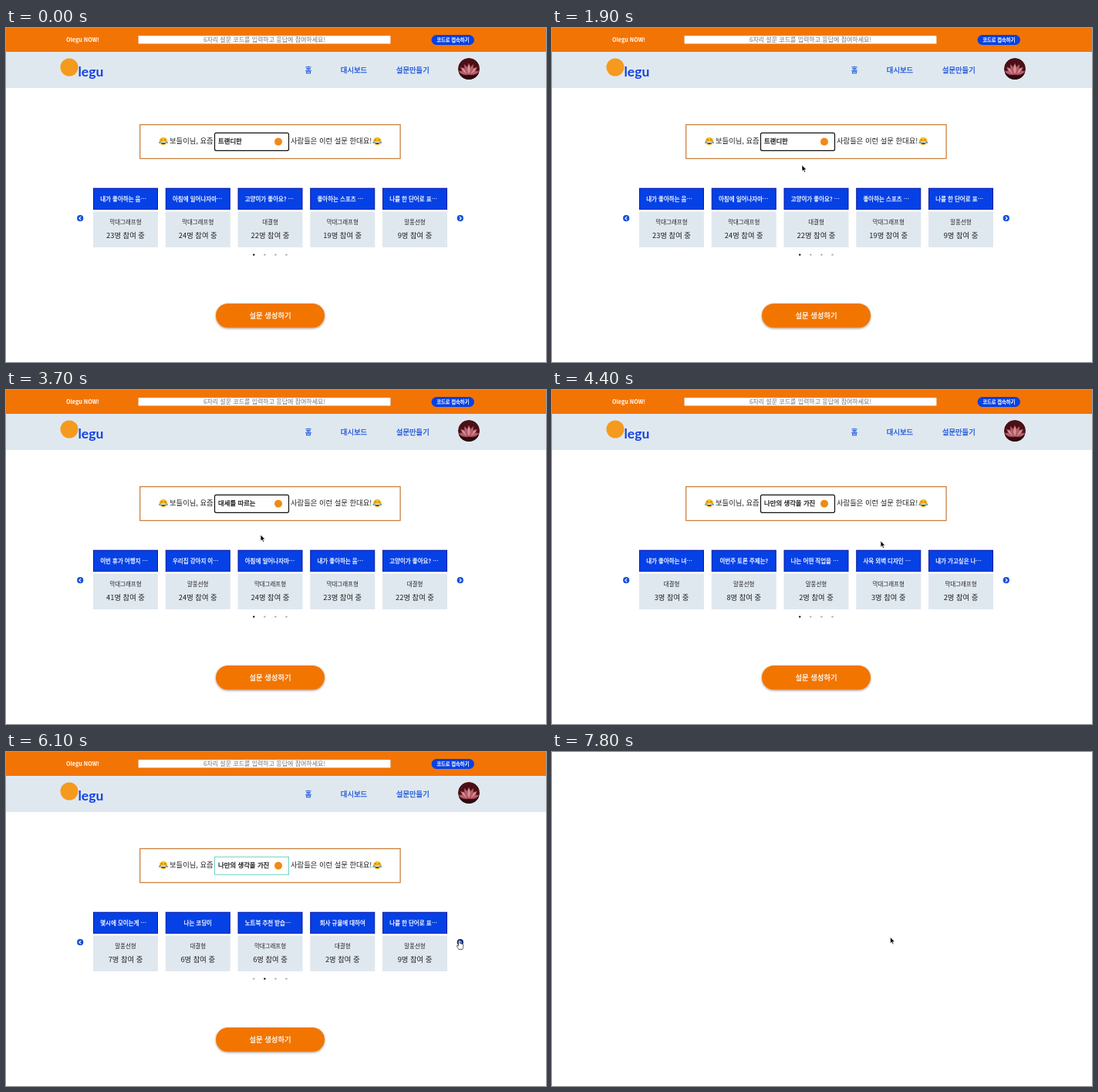
These frames come from a looping animation (700x434 px, 8 s). An HTML page:

```html
<!DOCTYPE html>
<html lang="ko">
<head>
<meta charset="utf-8">
<title>설문</title>
<style>
  html, body { margin: 0; width: 100%; height: 100%; overflow: hidden; background: #fff; }
  svg { display: block; width: 700px; height: 434px; font-family: "Noto Sans CJK KR", "Noto Sans CJK", "Noto Sans", sans-serif; }
  text { font-size: 9.33px; fill: #222; white-space: pre; }
  .mid { text-anchor: middle; }
  .medium { stroke: currentColor; stroke-width: .25px; fill: currentColor; }
  .nav { color: #1450d8; }
  .white { color: #fff; fill: #fff; }
  .small { font-size: 7.47px; }
  .option { font-size: 8.4px; }
</style>
</head>
<body>
<svg viewBox="0 0 700 434">
  <defs>
    <filter id="shade" x="-20%" y="-30%" width="140%" height="170%">
      <feDropShadow dx="0" dy="1" stdDeviation="1.5" flood-opacity=".4"/>
    </filter>
    <g id="joy">
      <circle r="5.3" fill="#fbc02d"/>
      <path d="M-3.4-1.2Q-2.2-3-1-1.2M1-1.2Q2.2-3 3.4-1.2" fill="none" stroke="#5b3a12" stroke-width=".8"/>
      <path d="M-3.3.7H3.3Q2.8 4 0 4T-3.3.7Z" fill="#6b3a16"/>
      <path d="M-3 .8H3L2.7 1.9H-2.7Z" fill="#fff"/>
      <path d="M-3.2 0Q-6.6.7-5.8 2.8Q-3.6 4-3.2 0ZM3.2 0Q6.6.7 5.8 2.8Q3.6 4 3.2 0Z" fill="#4aa8e8"/>
    </g>
    <g id="chevron">
      <circle r="4.1"/>
      <path d="M.9-2.1-1.2 0 .9 2.1" fill="none" stroke="#fff" stroke-width="1.2"/>
    </g>
    <path id="petal" d="M0 7Q-4.5 0 0-8Q4.5 0 0 7Z"/>
    <clipPath id="round"><circle r="14"/></clipPath>
  </defs>

  <g id="page">
    <rect width="700" height="31" fill="#f27405"/>
    <text x="78" y="17.7" class="white" style="font-size:7.2px;font-weight:700">Olegu NOW!</text>
    <rect x="171.5" y="10" width="327" height="10.5" rx=".8" fill="#fff" stroke="#d9a77a" stroke-width=".5"/>
    <text x="335" y="18" class="mid" style="font-size:8px;fill:#777">6자리 설문 코드를 입력하고 응답에 참여하세요!</text>
    <rect x="551.5" y="9" width="55.5" height="13" rx="6.5" fill="#0541e5"/>
    <text x="579.3" y="17.8" class="mid medium white" style="font-size:6.3px">코드로 접속하기</text>

    <rect y="31" width="700" height="47" fill="#e0e8ef"/>
    <circle cx="82" cy="51" r="11.5" fill="#f59a1c"/>
    <text x="93.5" y="62.5" style="font:700 17.5px Lato,sans-serif;fill:#1241e0">legu</text>
    <text x="392" y="58.3" class="mid medium nav">홈</text>
    <text x="451" y="58.3" class="mid medium nav">대시보드</text>
    <text x="527.3" y="58.3" class="mid medium nav">설문만들기</text>
    <g transform="translate(600 53)" clip-path="url(#round)">
      <circle r="14" fill="#4a1018"/>
      <path d="M-14 5H14V14H-14Z" fill="#2e0b10"/>
      <g id="lotus" transform="translate(0 1)"></g>
    </g>

    <rect x="173.7" y="125.6" width="337.4" height="44" fill="#fff" stroke="#cb8240" stroke-width="1.3"/>
    <use href="#joy" x="204" y="147"/>
    <text x="212" y="150.4">보들이님, 요즘</text>
    <text x="369" y="150.4">사람들은 이런 설문 한대요!</text>
    <use href="#joy" x="481.3" y="147"/>
    <rect id="select" x="270.5" y="136.3" width="96" height="23" fill="#fff"/>
    <text id="chosen" x="275" y="150.4" class="option medium" style="color:#111"></text>
    <circle cx="353" cy="147.7" r="5" fill="#f08a14"/>

    <g id="cards"></g>
    <use href="#chevron" transform="translate(96.2 247.2)" fill="#1450d8"/>
    <use id="next" href="#chevron" transform="translate(588.8 247.2) scale(-1 1)"/>
    <g id="dots"></g>

    <rect x="272" y="358" width="141" height="31.5" rx="15.7" fill="#f27405" filter="url(#shade)"/>
    <text x="342.5" y="377.3" class="mid medium white">설문 생성하기</text>

    <g id="menu">
      <rect x="270.5" y="159.5" width="96" height="35.5" fill="#fff" stroke="#999" stroke-width=".8" filter="url(#shade)"/>
      <rect id="mark" x="271" width="95" height="11.4" fill="#2492f5"/>
      <g id="options"></g>
    </g>
  </g>

  <g id="cursor" stroke="#fff" stroke-width=".7" stroke-linejoin="round">
    <path id="arrow" d="M0 0V8.3L1.9 6.6 3.2 9.6 4.6 9 3.3 6.1H5.8Z" fill="#000"/>
    <path id="hand" d="M-1 .8Q0-.6 1 .8V4Q2-.1 2.6 4.2Q3.7 3.6 4 4.8Q5.3 4.4 5.3 5.8V8.5L4.2 11.5H-.6L-3.2 7Q-3.2 5.4-1 7Z" fill="#fff" stroke="#222"/>
  </g>
</svg>
<script>
const $ = id => document.getElementById(id);
const show = (id, on) => $(id).setAttribute('visibility', on ? 'inherit' : 'hidden');
const set = (id, attrs) => Object.entries(attrs).forEach(([k, v]) => $(id).setAttribute(k, v));

const LOOP = 8000, STEP = 100, CARD_X = 113, CARD_W = 84, PITCH = 93.75;
const choices = ['트랜디한', '대세를 따르는', '나만의 생각을 가진'];
const BAR = '막대그래프형', DUEL = '대결형', BUBBLE = '말풍선형';
const food = ['내가 좋아하는 음…', BAR, 23], morning = ['아침에 일어나자마…', BAR, 24];
const cat = ['고양이가 좋아요? …', DUEL, 22], word = ['나를 한 단어로 표…', BUBBLE, 9];
const decks = [
  [food, morning, cat, ['좋아하는 스포츠 …', BAR, 19], word],
  [['이번 휴가 여행지 …', BAR, 41], ['우리집 강아지 이…', BUBBLE, 24], morning, food, cat],
  [['내가 좋아하는 녀…', DUEL, 3], ['이번주 토론 주제는?', BUBBLE, 8], ['나는 어떤 직업을 …', BUBBLE, 2],
    ['사옥 외벽 디자인 …', BAR, 3], ['내가 가고싶은 나…', BAR, 2]],
  [['몇시에 모이는게 …', BUBBLE, 7], ['나는 코딩이', DUEL, 6], ['노트북 추천 받습…', BAR, 6],
    ['회사 규율에 대하여', DUEL, 2], word],
];

// Cursor tip: time, x, y
const track = [
  [500, 671, 263], [600, 560, 226], [700, 440, 183], [800, 355, 156], [900, 329, 148],
  [1300, 329, 148], [1400, 324, 163], [1600, 324, 178], [1900, 324, 178], [2300, 328, 150],
  [2900, 328, 150], [3300, 330, 188], [4100, 330, 188], [4400, 426, 196],
  [5200, 426, 196], [5700, 592, 246], [5900, 587.5, 245], [6500, 587.5, 245], [6600, 587, 245.5],
  [6700, 587, 245.5], [7100, 550, 223.5], [7500, 550, 223.5], [7800, 438.5, 240.5],
];

function cursorAt(t) {
  const i = track.findIndex(key => key[0] > t);
  if (i < 0) return track.at(-1).slice(1);
  if (i === 0) return track[0].slice(1);
  const [t0, x0, y0] = track[i - 1], [t1, x1, y1] = track[i];
  const k = (t - t0) / (t1 - t0);
  return [x0 + (x1 - x0) * k, y0 + (y1 - y0) * k];
}

function cardMarkup([title, type, count], i) {
  const cut = title.endsWith('…'), mid = CARD_W / 2;
  return `<g transform="translate(${CARD_X + i * PITCH} 0)">
    <rect x=".5" y="208.3" width="83" height="27.4" fill="#0541e5" stroke="#0618a8"/>
    <rect y="238.5" width="${CARD_W}" height="46.5" fill="#e0e8ef"/>
    <text x="${cut ? 9.2 : mid}" y="224.5" class="small white medium${cut ? '' : ' mid'}">${title}</text>
    <text x="${mid}" y="255.3" class="small mid">${type}</text>
    <text x="${mid}" y="272.5" class="mid">${count}명 참여 중</text></g>`;
}

function drawDeck(deck) {
  $('cards').innerHTML = decks[deck].map(cardMarkup).join('');
  const active = deck === 3 ? 1 : 0;
  $('dots').innerHTML = [0, 1, 2, 3].map(i =>
    `<circle cx="${321.2 + i * 14.1}" cy="294.6" r="1.2" fill="${i === active ? '#000' : '#aaa'}"/>`).join('');
}

$('lotus').innerHTML = [-75, 75, -50, 50, -25, 25, 0].map((angle, i) =>
  `<use href="#petal" transform="rotate(${angle} 0 6)" fill="${i % 4 < 2 ? '#b9606c' : '#d98f96'}" stroke="#8d3644" stroke-width=".5"/>`).join('');

let shownDeck = -1;
function render(now) {
  const t = Math.floor(now % LOOP / STEP) * STEP;
  const within = (a, b) => t >= a && t < b;
  const [x, y] = cursorAt(t);
  const blank = t >= 7600;
  const open = within(1000, 1900) || within(2700, 3700);
  const choice = t < 2200 ? 0 : t < 4000 ? 1 : 2;
  const deck = t < 6100 ? choice : 3;

  if (deck !== shownDeck) drawDeck(shownDeck = deck);
  $('chosen').textContent = choices[choice];
  show('page', !blank);
  show('menu', open && !blank);

  const hot = y > 160 ? Math.min(2, Math.floor((y - 160) / 11.5)) : choice;
  set('mark', { y: 160 + hot * 11.5 });
  $('options').innerHTML = choices.map((label, i) =>
    `<text x="275" y="${168.8 + i * 11.3}" class="option${i === hot ? ' white' : ''}">${label}</text>`).join('');

  const blurred = t >= 5900;
  set('select', { stroke: blurred ? '#6fd0c4' : '#111', 'stroke-width': blurred ? 1 : 1.2, rx: blurred ? 0 : 2 });
  set('next', { fill: within(5700, 7400) ? '#0a2a8c' : '#1450d8' });

  const onCard = y > 208 && y < 285 && x > CARD_X && x < 572 && (x - CARD_X) % PITCH < CARD_W;
  const onNext = Math.hypot(x - 588.8, y - 247.2) < 5;
  const pointing = !blank && (onCard || onNext);
  show('cursor', t >= 500);
  show('arrow', t >= 500 && !pointing);
  show('hand', t >= 500 && pointing);
  set('cursor', { transform: `translate(${x} ${y})` });
}

const start = performance.now();
function tick() {
  render(performance.now() - start);
  requestAnimationFrame(tick);
}
tick();
</script>
</body>
</html>
```
